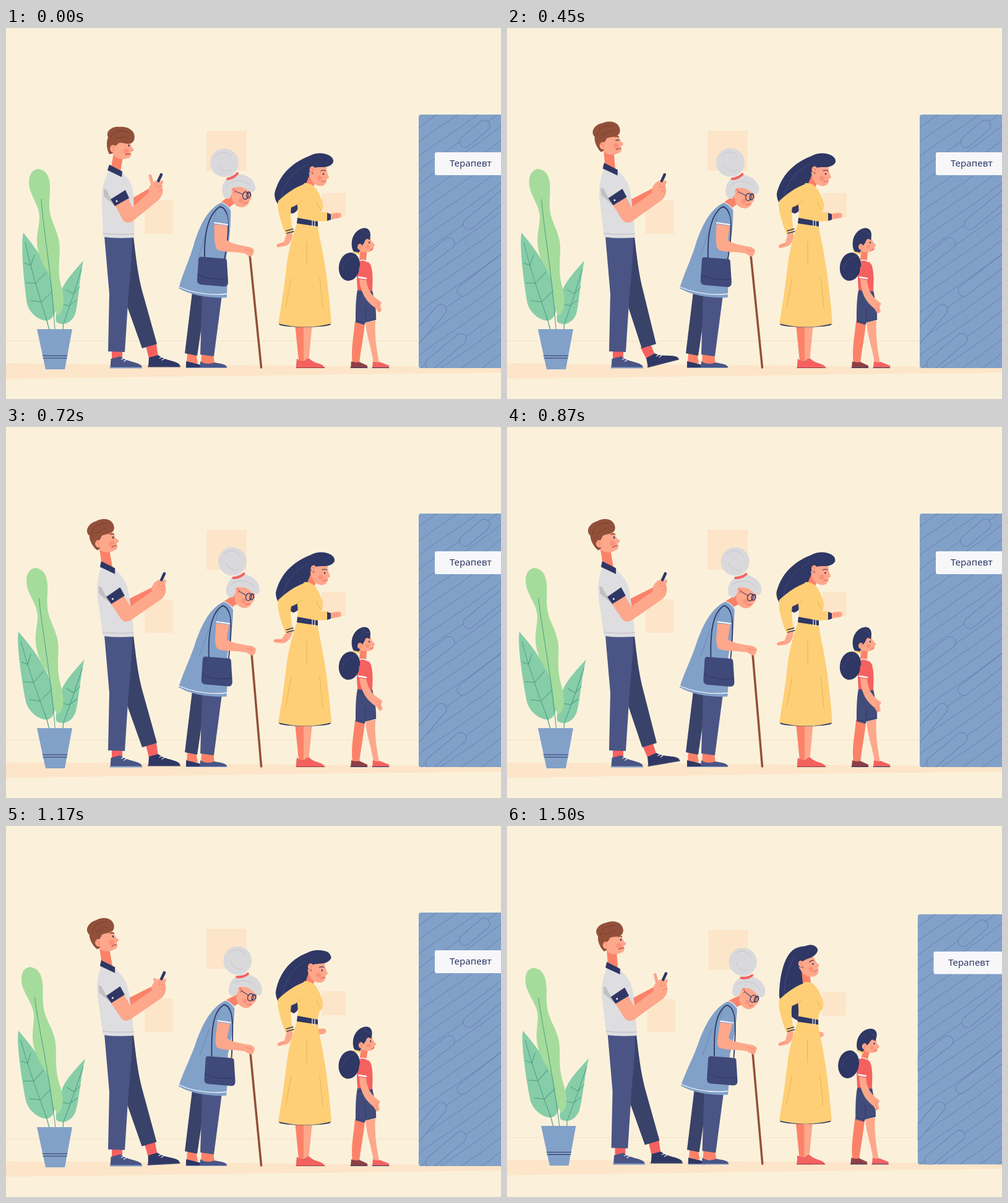
An HTML page with a canvas for the animation above (1.53 s loop, 800 px wide and 600 px high).

```html
<!DOCTYPE html>
<html lang="ru">
<head>
<meta charset="utf-8">
<title>Очередь</title>
<style>
html, body { margin: 0; width: 100%; height: 100%; overflow: hidden; background: #fbf1db; }
canvas { display: block; }
</style>
</head>
<body>
<canvas id="stage" width="800" height="600"></canvas>
<script>
const ctx = document.getElementById('stage').getContext('2d');
const LOOP = 1530, STEP = 30;
const C = {
  wall: '#fbf1db', peach: '#fde5c9', blue: '#82a1c9', grain: '#6681ad', navy: '#2f3764',
  indigo: '#4a5586', dusk: '#394269', skin: '#fda78b', shade: '#fb8268', red: '#f5615f',
  maroon: '#8d4046', brown: '#92503a', bark: '#743c2c', shirt: '#dedee1', silver: '#d9d9dc',
  white: '#f7f7fa', yellow: '#fecf76', fold: '#dfac51', leaf: '#86cda8', lime: '#a5dc9c', vein: '#4d9c83'
};
let time = 0;

function fill(d, color) {
  ctx.fillStyle = color;
  ctx.fill(new Path2D(d));
}
function line(d, color, width = 1) {
  ctx.strokeStyle = color;
  ctx.lineWidth = width;
  ctx.stroke(new Path2D(d));
}
function oval(x, y, rx, ry, color, turn = 0) {
  ctx.fillStyle = color;
  ctx.beginPath();
  ctx.ellipse(x, y, rx, ry, turn, 0, 7);
  ctx.fill();
}
function box(x, y, w, h, color) {
  ctx.fillStyle = color;
  ctx.fillRect(x, y, w, h);
}
// Moves a part by (dx, dy) and turns it by deg around (cx, cy).
function pose(dx, dy, deg, cx, cy, draw) {
  ctx.save();
  ctx.translate(cx + dx, cy + dy);
  ctx.rotate(deg * Math.PI / 180);
  ctx.translate(-cx, -cy);
  draw();
  ctx.restore();
}
// Shears a part sideways above the line y = base.
function lean(slope, base, draw, stretch = 1) {
  ctx.save();
  ctx.transform(1, 0, -slope, stretch, slope * base, base * (1 - stretch));
  draw();
  ctx.restore();
}
// Eased value at the current time; arguments alternate time, value.
function key(...k) {
  if (time <= k[0]) return k[1];
  for (let i = 2; i < k.length; i += 2) {
    if (time < k[i]) {
      const u = (time - k[i - 2]) / (k[i] - k[i - 2]);
      return k[i - 1] + (k[i + 1] - k[i - 1]) * u * u * (3 - 2 * u);
    }
  }
  return k[k.length - 1];
}
function morph(from, to, k) {
  const end = to.match(/[\d.]+/g);
  let i = 0;
  return from.replace(/[\d.]+/g, n => +n + (end[i++] - n) * k);
}

function room() {
  fill('M-30 542Q400 545 830 549V557Q400 562 -30 568Z', C.peach);
  line('M-30 506H668', '#f9e6cb', 1.5);
  box(324, 166, 65, 65, C.peach);
  box(224, 279, 46, 54, C.peach);
  box(510, 267, 39, 39, C.peach);
}

function door() {
  ctx.save();
  ctx.beginPath();
  ctx.roundRect(667, 140, 200, 410, 4);
  ctx.fillStyle = C.blue;
  ctx.fill();
  ctx.clip();
  for (let y = 167; y < 720; y += 23) {
    line(`M660 ${y}C700 ${y - 33} 750 ${y - 58} 830 ${y - 125}`, C.grain);
  }
  const knots = [[742, 184, 773, 158], [748, 317, 815, 262], [660, 391, 716, 348],
    [738, 425, 815, 366], [662, 503, 703, 456], [687, 543, 735, 503]];
  for (const [x1, y1, x2, y2] of knots) {
    const d = `M${x1} ${y1}L${x2} ${y2}`;
    line(d, C.grain, 19);
    line(d, C.blue, 17);
  }
  ctx.restore();
  ctx.fillStyle = C.white;
  ctx.beginPath();
  ctx.roundRect(693, 201, 140, 37, 3);
  ctx.fill();
  ctx.fillStyle = C.navy;
  ctx.font = '15.2px "Noto Sans", "Open Sans", sans-serif';
  ctx.fillText('Терапевт', 717, 224);
}

function plant() {
  const sway = key(90, 0, 750, 1);
  lean(-sway * 8 / 142, 473, () => {
    fill('M28 331C23 352 30 420 34 446C40 466 58 474 66 473C78 472 82 455 81 440C80 410 62 372 28 331Z', C.leaf);
    line('M31 347Q44 405 66 473M32 412L48 413L65 395M40 441L57 443L77 424M30 380L40 384L46 367', C.vein);
  });
  line('M65 470L70 488M93 470L92 488', C.vein, 1.2);
  lean(key(450, 0, 990, 3) / 100, 476, () => {
    fill('M125 376C108 396 92 412 88 430C84 446 78 470 82 476C92 482 106 478 112 462C117 445 118 410 125 376Z', C.leaf);
    line('M122 390Q108 436 93 478M97 423L109 430L119 419M90 447L102 449L114 440', C.vein);
  });
  lean(key(0, 0, 450, -1.5, 1320, -14) / 237, 470, () => {
    fill('M52 228C40 229 34 243 39 262C44 278 54 290 54 305C54 325 46 338 53 365C58 385 68 390 73 410C77 425 74 455 84 465C96 456 94 436 90 420C86 405 85 395 86 375C88 350 87 345 80 325C72 305 70 300 70 280C72 258 74 230 52 228Z', C.lime);
    line('M57 277C60 325 73 390 79 488', C.vein);
  });
  fill('M50 487H107L95 552H64Z', C.blue);
  line('M59 530H99M60 534H98', C.navy, 1.2);
}

function sneaker(color) {
  fill('M231 533L246 529C256 538 277 538 281 545L280 548H230Z', color);
  line('M230 547.5H281', color === C.navy ? C.dusk : C.blue, 2);
  line('M248 534L253 532M252 537L257 534', C.white, 1.2);
}

function manHead(turn) {
  const blink = time >= 390 && time < 510;
  pose(-24 * turn, -6 * turn, -12 * turn, 173, 194, () => {
    fill('M169 181L200 182C202 187 201 191 205 195C208 198 205 200 202 200C203 207 201 211 195 211C186 214 174 210 171 200Z', C.skin);
    oval(194, 199, 4.5, 4.5, '#fc927b');
    line('M193 205Q197 203 201 204', C.maroon, 1.1);
    line('M195 184Q198 183 201 185', C.bark, 1.4);
    if (blink) line('M195 190H201', C.navy, 1.2);
    else oval(198.5, 190, 1.2, 1.7, C.navy);
  });
  pose(-24 * turn, -6 * turn, -24 * turn, 173, 194, () => {
    fill('M167 204C162 195 162 183 165 177C160 166 173 158 184 160C194 159 202 163 206 169C210 177 207 186 200 187C192 188 187 184 182 186C180 190 177 188 176 193L172 203Z', C.brown);
    line('M169 177C176 164 192 164 200 171M176 177C184 180 190 174 195 177', C.bark, 0.8);
  });
  pose(-24 * turn, -6 * turn, -12 * turn, 173, 194, () => {
    oval(173, 195, 5, 6, C.skin);
    line('M170 192Q176 191 173 198', C.shade, 1.3);
  });
}

function man() {
  const turn = key(120, 0, 600, 1, 1380, 1, 1720, 0);
  const tilt = -13 * turn;
  const tap = key(60, 0, 390, 0.85, 450, 0.75, 660, 0, 750, 0, 990, 1, 1230, 0);
  const thumb = key(0, 1, 150, 0, 1080, 0, 1290, 1);
  const hx = 5 * turn, ex = tilt * 0.24, cx = tilt * 0.5;

  pose(-4 * tap, 0, -19 * tap, 233, 545, () => {
    fill('M226 514L243 511L246 532L231 535Z', C.red);
    sneaker(C.navy);
  });
  fill(`M180 337H206C210 372 213 398 220 425L${244 - 4 * tap} 511L${220 - 3 * tap} 518L194 445Z`, C.dusk);
  fill('M171 521H188V535H171Z', C.red);
  pose(-61.5, 2, 0, 0, 0, () => sneaker(C.indigo));
  fill('M159 337L204 338C204 370 201 400 198 430L192 524L165 523L167 430Z', C.indigo);

  line(`M${177 + tilt} ${231 - 4 * turn}L${182 - 23 * turn} ${203 - 5 * turn}`, C.shade, 16);
  line(`M${195 + ex} 288L${237 + hx} 263`, C.shade, 12);
  lean(tilt / 118, 340, () => {
    fill('M167 228C160 244 154 256 155 285L157 338Q180 341 207 339C208 318 207 298 206 270C205 253 198 243 188 234Z', C.shirt);
    fill('M158 260L178 268L176 288L158 272Z', '#c1c0c3');
    line('M157 332Q181 335 207 333', '#bbbbc2', 1);
    fill('M167 221L188 232L187 241L164 230Z', C.navy);
  }, 1 + 0.034 * turn);

  fill(`M${176 + cx} 286L${197 + cx} 273L${204 + ex} 290L${232 + hx} 265L${248 + hx} 277L${204 + ex} 313Q${194 + ex} 318 ${188 + ex} 309Z`, C.skin);
  pose(hx, 0, 0, 0, 0, () => {
    line('M245 250L251 237', C.navy, 4.5);
    if (thumb > 0.02) line(`M237 254L${237 - 4 * thumb} ${254 - 15 * thumb}`, C.skin, 5);
    fill('M230 264C230 256 236 249 242 247L247 250L252 246Q256 248 252 254C255 264 253 273 246 278Z', C.skin);
    line('M244 251L242 258M251 256L245 258M252 262L246 264', C.shade, 1);
  });
  lean(tilt / 118, 340, () => {
    fill('M162 249C174 244 187 251 193 263L170 277C165 268 160 258 162 249Z', C.shirt);
    fill('M169 277L193 262L199 275L176 288Z', C.navy);
    oval(179, 280, 1.5, 1.5, C.white);
  }, 1 + 0.034 * turn);
  manHead(turn);
}

function grandmaHead(p) {
  line(`M${352 + 8 * p} 288L${371 + 13 * p} ${272 + 4 * p}`, C.shade, 15);
  pose(13 * p, 4 * p, 15 * p, 375, 258, () => {
    oval(353, 218, 23, 23, C.silver);
    line('M338 208C344 199 357 199 364 207M343 222C348 231 358 234 365 229', '#c0c0c7', 0.8);
    fill('M364 259C372 251 386 254 397 262C395 271 399 275 394 279C392 287 385 292 376 289C368 286 362 278 364 259Z', C.skin);
    oval(380, 279, 4, 4, '#fc927b');
    fill('M352 273C346 262 350 245 365 238C382 232 402 242 403 258C403 267 396 266 390 262C381 256 372 254 367 262L362 275Q357 278 352 273Z', C.silver);
    line('M355 256C366 244 384 244 394 254', '#c0c0c7', 0.8);
    oval(369, 263, 4.5, 5.5, C.skin);
    line('M366 261Q372 260 369 267M384 284L390 282', C.red, 1.2);
    line('M358 244Q368 243 374 235', C.red, 4);
    line('M370 264L383 269M391 266L395 268', C.navy, 1);
    ctx.strokeStyle = C.navy;
    ctx.lineWidth = 1.3;
    ctx.beginPath();
    ctx.ellipse(387, 271, 4.5, 6, 0.15, 0, 7);
    ctx.moveTo(396, 270);
    ctx.ellipse(392, 270, 3, 5, 0.15, 0, 7);
    ctx.stroke();
  });
}

function grandma() {
  const p = time / 1320;
  const reach = key(450, 0, 690, 3, 1020, 3, 1260, 0, 1500, 2.5);
  const bag = key(0, 0, 1500, 13) * 0.35 + Math.min(12.5, time / 100) * 0.65;

  fill('M293 526H307L310 542H292ZM316 528H335L337 543H315Z', C.shade);
  fill('M291 539L309 543L320 547V550H291Z', C.navy);
  fill('M314 539Q324 546 337 541C348 543 358 544 357 550H313Z', C.indigo);
  line('M291 549.5H357', C.blue, 1);
  fill('M301 427L324 430L309 530L289 526Z', C.dusk);
  fill('M317 430L349 432L336 531L314 528Z', C.indigo);
  line(`M${394 + reach} 367L412.5 549`, C.brown, 3.5);
  grandmaHead(p);
  lean(p * 7.5 / 135, 420, () => {
    fill('M343 285C322 298 312 325 305 345C298 372 286 395 279 421C300 433 330 437 357 436C358 410 357 390 356 370C362 340 364 312 363 292Q353 279 343 285Z', C.blue);
    line('M280 419Q315 434 357 430', C.white, 1.3);
    line('M348 282Q357 285 363 294', C.white, 1.3);
    line('M325 326Q317 353 311 370', C.grain, 0.8);
  });
  const s = 7 * p;
  line(`M${321 + bag} 372C${320 + bag} 330 ${328 + s} 300 ${346 + s} 289C${365 + s} 292 ${360 + s} 340 ${353 + bag} 374`, C.navy, 1.8);
  pose(bag, bag * 0.2, 0, 0, 0, () => {
    fill('M315 370L353 373Q357 373 357 378L359 411Q359 419 351 418L315 415Q308 414 309 406L311 375Q311 370 315 370Z', '#3f497a');
    line('M310 399Q332 409 358 405', C.navy, 1);
  });
  const a = 5 * p;
  fill(`M${337 + a} 317C${336 + a} 333 336 350 341 358C350 364 374 361 ${387 + reach} 365L${394 + reach} 355C382 351 364 350 357 343L${358 + a} 319Z`, C.skin);
  fill(`M${383 + reach} 354Q${395 + reach} 352 ${401 + reach} 359Q${400 + reach} 367 ${396 + reach} 370L${387 + reach} 366Z`, C.skin);
  line(`M${386 + reach} 358L${397 + reach} 361`, C.shade, 1);
  lean(p * 7.5 / 135, 420, () => {
    fill('M340 296C350 290 360 297 359 320L336 317Z', C.blue);
    line('M337 315L358 318', C.white, 2);
    line('M340 296Q336 305 336 313', C.grain, 0.8);
  });
}

function woman() {
  const rise = key(1050, 0, 1500, 1.5);
  const drift = key(0, 0, 450, 2, 720, 2, 990, 1) * Math.max(0, 1 - rise);
  const drop = key(900, 0, 1260, 1);
  const out = key(0, 0.2, 180, 0, 540, 0, 690, 1, 780, 1, 930, 0, 1170, 0, 1290, 1, 1380, 1, 1500, 0);

  fill('M467 478H485L482 539H473Z', C.shade);
  fill('M481 478H495L489 540H481Z', C.skin);
  fill('M470 535Q478 542 483 538L494 546V550H469Z', C.maroon);
  fill('M470 536L482 540Q485 533 491 535C497 543 514 542 515 550H469Z', C.red);
  line('M469 549.5H515', C.maroon, 1);
  oval(483, 479, 42, 5, C.navy);

  pose(drift, 0, 0, 0, 0, () => {
    fill(morph(
      'M490 207C505 199 524 202 529 214C524 228 506 224 500 235C494 248 484 253 479 262C475 285 473 299 462 300C444 291 434 284 434 268C439 246 454 221 490 207Z',
      'M476 199C490 193 506 195 509 206C506 216 492 215 489 228C486 245 482 250 480 262C476 285 476 300 472 311C454 305 440 290 438 272C440 238 452 208 476 199Z', rise), C.navy);
    line(morph('M488 220C462 232 447 254 444 281', 'M474 212C456 227 447 254 447 281', rise), '#4a5280', 0.8);
    line(`M${490 - 3 * rise} 256L${498 - 10 * rise} ${237 - 4 * rise}`, C.shade, 13);
    pose(-13 * rise, -5 * rise, -14 * rise, 495, 228, () => {
      fill('M489 222L517 220C519 230 518 235 522 241C522 243 518 243 518 246C518 254 510 258 502 254C493 251 489 240 489 222Z', C.skin);
      oval(507, 243, 4, 4, '#fc927b');
      oval(513, 236, 1.2, 1.6, C.navy);
      line('M509 231Q513 229 516 231', C.navy, 1.2);
      line('M510 249Q514 247 517 248', C.red, 1.3);
      fill('M486 230C484 214 502 200 520 205Q529 208 529 217C522 229 507 223 499 226L496 236Z', C.navy);
      oval(495, 229, 4.5, 5.5, C.skin);
      line('M492 227Q498 226 495 233', C.shade, 1.2);
    });
  });

  pose(-29 * drop, 34 * drop, 0, 0, 0, () => {
    fill('M496 298L521 298V312L500 313Z', C.yellow);
    fill('M523 302Q529 298 540 299Q544 303 540 307L524 310Z', C.skin);
    line('M530 301V306M535 301V306', C.shade, 1);
    fill('M519 299L525 301V310L519 312Z', C.navy);
  });
  fill('M482 251C494 249 503 259 508 273C512 281 514 288 510 296C504 302 504 310 504 318L470 315C474 295 470 283 468 268Z', C.yellow);
  fill('M471 314L504 319C505 335 510 349 512 365C519 400 523 442 526 478Q483 489 440 478C446 443 450 415 454 380C459 348 466 329 471 314Z', C.yellow);
  line('M461 405L452 451M507 404L512 453M486 346V383M502 282Q505 292 510 295', C.fold, 0.8);
  fill('M471 307L504 313V321L470 316Z', C.navy);
  line('M495 311V321M499 312V322', C.white, 1.2);

  pose(0, 0, 20 * out, 459, 332, () => {
    fill('M454 332L463 330C464 343 459 351 453 353L441 356Q436 354 441 350L450 347Z', C.skin);
    line('M450 349L441 353', C.shade, 0.9);
  });
  fill('M487 252C472 253 450 270 440 280C437 290 444 314 452 334L464 331C461 315 459 300 461 290C473 286 483 278 489 268Z', C.yellow);
  line('M453 328L464 325M454 332L465 329', C.navy, 1.5);
  line('M461 290Q473 285 479 279', C.fold, 0.8);
}

function girl() {
  const look = key(990, 0, 1560, 9);
  const swing = key(0, 0.6, 150, 0, 540, 0, 690, 1, 870, 0);

  fill('M564 474L580 478C577 505 573 524 571 542H560C557 518 562 499 564 474Z', C.shade);
  fill('M581 476L597 473C595 500 600 524 603 542H594C591 519 583 501 581 476Z', C.skin);
  fill('M558 539Q565 542 571 540L584 546V550H557Z', C.maroon);
  fill('M593 539Q599 542 604 540L619 546V550H592Z', C.red);
  line('M557 549.5H584M592 549.5H619', C.navy, 1);
  fill('M568 424H592C595 440 599 455 598 472L581 476L579 480L565 476C565 457 565 439 568 424Z', '#424c7a');
  line('M581 453V474M567 473L580 477M583 475L598 471M568 429H592', C.navy, 0.9);
  line(`M${576 + look * 0.3} 380L${578 + look * 0.7} 359`, C.shade, 11);
  fill('M569 378C577 372 588 378 590 385C594 400 592 415 592 426L568 424C567 405 566 390 569 378Z', C.red);
  line('M570 377Q577 373 584 378', C.white, 1.3);

  pose(-look * 0.15, 0, 0, 0, 0, () => {
    oval(555, 386, 17, 23, C.navy, 0.18);
    line('M568 369C556 369 546 377 544 390', '#4a5280', 0.7);
  });
  pose(look * 0.9, look * 0.3, look * 1.1, 573, 353, () => {
    fill('M567 342L589 338C590 345 592 347 596 350C597 353 593 353 594 357C592 363 581 364 573 361Z', C.skin);
    fill('M560 358C556 343 562 330 573 325C582 321 589 325 589 335L588 343C583 339 581 341 579 347L574 355L570 365Q562 365 560 358Z', C.navy);
    line('M575 327Q581 333 587 334', '#4a5280', 0.7);
    oval(572, 354, 4, 5, C.skin);
    line('M570 352Q575 351 572 357', C.shade, 1.1);
    oval(587, 347, 1.1, 1.5, C.navy);
    oval(584, 354, 3, 3, '#fc927b');
    line('M589 359L593 357', C.red, 1.2);
    line('M562 363L571 365', C.yellow, 3);
  });

  pose(0, 0, -6 * swing, 576, 407, () => {
    fill('M571 405L582 406C583 421 587 431 599 441L605 446L602 450L604 459L599 462L594 454C583 445 572 433 571 405Z', C.skin);
    line('M598 450L600 459M602 450L597 445', C.shade, 1);
  });
  fill('M571 386Q581 381 585 391L582 408L569 405Z', C.red);
  line('M570 403L582 405', C.white, 2.5);
}

function draw(now) {
  time = Math.floor(now % LOOP / STEP) * STEP;
  ctx.setTransform(1, 0, 0, 1, 0, 0);
  box(0, 0, 800, 600, C.wall);
  ctx.lineCap = 'round';
  ctx.lineJoin = 'round';

  // The camera starts to pull back just before the loop restarts.
  const pull = Math.max(0, (time - 1350) / 150) ** 2;
  const zoom = 1 - 0.0135 * pull;
  ctx.translate(434, 345);
  ctx.scale(zoom, zoom);
  ctx.translate(-434, -345);

  room();
  door();
  plant();
  man();
  grandma();
  woman();
  girl();
  requestAnimationFrame(draw);
}

const start = performance.now();
draw(0);
function tick() {
  draw(performance.now() - start);
}
</script>
</body>
</html>
```
